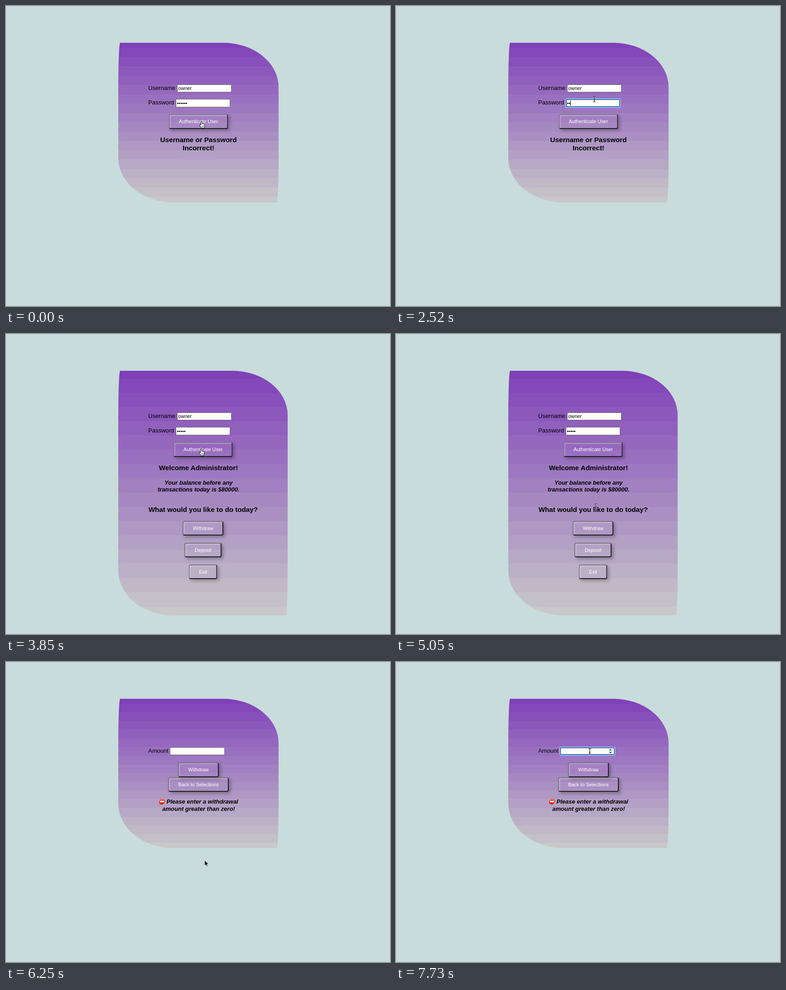
An HTML page that plays this animation: 848x661 px, repeating every 8000 ms.

```html
<!DOCTYPE html>
<html lang="en">
<head>
<meta charset="utf-8">
<title>Account login</title>
<style>
  html, body { margin: 0; width: 100%; height: 100%; overflow: hidden; }
  body { position: relative; background: #c8dcdb; color: #000; font: 13px "Liberation Sans", Arial, sans-serif; }
  body *, .field::after { box-sizing: border-box; position: absolute; }

  .timed, .pressable { animation: 8s step-end infinite; }
  .scene { inset: 0; opacity: 0; }
  .card {
    left: 248px; top: 81px; width: 353.5px; height: var(--h);
    border-radius: 4px 122px 4px 122px / 98px;
  }

  /* --x is the left edge or centre, --y the middle of the line */
  .text { left: var(--x); top: var(--y); line-height: 0; white-space: nowrap; }
  .mid { transform: translateX(-50%); }
  .head { font-weight: bold; font-size: 15.2px; }
  .note { font-weight: bold; font-style: italic; }

  .button {
    left: var(--x); top: var(--y); width: var(--w); height: 32.5px;
    transform: translateX(-50%);
    border: 2px solid; border-color: #7e7685 #201b24 #201b24 #7e7685; border-radius: 4px;
    box-shadow: 4px 4px 7px rgba(0,0,0,.28), inset 2px 2px 2px rgba(255,255,255,.32);
    color: #fff; font-size: 10.9px; line-height: 28px; text-align: center; white-space: nowrap;
  }

  .field {
    left: var(--x); top: var(--y); width: 120.5px; height: 17.5px; padding-left: 2px;
    display: flex; align-items: center;
    background: #fff; border: 1px solid #767676; font-size: 10.9px;
  }
  .field > span { position: static; }
  .field::after {
    content: ""; inset: -1px; opacity: 0; border: 2px solid #1766c0; border-radius: 2px;
    box-shadow: 0 0 0 1px #edf3fa; animation: var(--focus, none) 8s step-end infinite;
  }
  .dots { width: 1.75em; height: 13px; line-height: 13px; overflow: hidden; }
  .caret { width: 1px; height: 12px; background: #000; opacity: 0; }
  .spinner { right: 4px; top: 1px; width: 9px; height: 13px; background: #efefef; opacity: 0; }
  .spinner svg { left: 0; top: 0; }

  .stop {
    left: 338px; top: 301px; width: 13px; height: 13px; border-radius: 50%;
    background: linear-gradient(#ff7a5c, #e8331c 45%, #cc1a0c); transform: skewX(-10deg);
  }
  .stop::after { content: ""; position: absolute; left: 2px; top: 5px; width: 9px; height: 3px; background: #fff; }

  .cursor { left: 0; top: 0; animation-name: move; }
  .cursor svg { left: 0; top: 0; overflow: visible; width: 1px; height: 1px; opacity: 0; }

  @keyframes login    { 0% { opacity: 1 } 48.125% { opacity: 0 } }
  @keyframes menu     { 0%, 78.125% { opacity: 0 } 48.125% { opacity: 1 } }
  @keyframes withdraw { 0% { opacity: 0 } 78.125%, 100% { opacity: 1 } }

  @keyframes focus-password { 0%, 46.25% { opacity: 0 } 14.875% { opacity: 1 } }
  @keyframes focus-amount   { 0% { opacity: 0 } 91.125%, 100% { opacity: 1 } }
  @keyframes hover-amount   { 0% { opacity: 0 } 89.25%, 100% { opacity: 1 } }
  @keyframes caret-password { 0%, 20.375%, 46.25% { opacity: 0 } 14.875%, 31.5% { opacity: 1 } }
  @keyframes caret-amount   { 0%, 96.625%, 100% { opacity: 0 } 91.125% { opacity: 1 } }
  @keyframes typing {
    0% { width: 2.1em; background: none }
    24.125% { width: 2.1em; background: #b3d7ff }
    31.5% { width: .7em; background: none }
    33.375% { width: 1.05em; background: none }
    37.125%, 100% { width: 1.75em; background: none }
  }
  @keyframes press-login {
    0%, 48.125% { border-color: #7e7685 #201b24 #201b24 #7e7685 }
    46.25% { border-color: #201b24 #7e7685 #7e7685 #201b24 }
  }
  @keyframes press-withdraw {
    0%, 78.125% { border-color: #7e7685 #201b24 #201b24 #7e7685 }
    76.25% { border-color: #201b24 #7e7685 #7e7685 #201b24 }
  }

  @keyframes hand {
    0%, 44.5%, 66.875%, 87.5% { opacity: 1 }
    9.25%, 57.5%, 72.5%, 89.25% { opacity: 0 }
  }
  @keyframes arrow {
    9.25%, 42.625%, 57.5%, 65%, 72.5% { opacity: 1 }
    0%, 11.125%, 44.5%, 59.375%, 66.875%, 85.625% { opacity: 0 }
  }
  @keyframes beam {
    11.125%, 59.375%, 85.625%, 89.25%, 100% { opacity: 1 }
    0%, 42.625%, 65%, 87.5% { opacity: 0 }
  }
  @keyframes move {
    0% { transform: translate(432px, 254.5px) }
    5.5% { transform: translate(433px, 249px) }
    7.375% { transform: translate(434px, 241px) }
    9.25% { transform: translate(436px, 230px) }
    11.125% { transform: translate(437px, 214px) }
    13% { transform: translate(438px, 205px) }
    40.875% { transform: translate(437px, 215px) }
    42.625% { transform: translate(434px, 235px) }
    44.5% { transform: translate(431px, 253.5px) }
    55.625% { transform: translate(432px, 262px) }
    57.5% { transform: translate(434px, 280px) }
    59.375% { transform: translate(436px, 308px) }
    61.25% { transform: translate(439px, 345px) }
    63.125% { transform: translate(441px, 380px) }
    65% { transform: translate(442px, 405px) }
    66.875% { transform: translate(445px, 417px) }
    68.75% { transform: translate(443px, 423px) }
    70.625% { transform: translate(440px, 430px) }
    72.5% { transform: translate(438.5px, 436.5px) }
    81.875% { transform: translate(437px, 420px) }
    83.75% { transform: translate(435px, 370px) }
    85.625% { transform: translate(432px, 310px) }
    87.5% { transform: translate(430px, 255px) }
    89.25%, 100% { transform: translate(428px, 197px) }
  }
</style>
</head>
<body>
  <div class="scene timed" style="animation-name: login">
    <div class="card" style="--h: 352px"></div>
    <div class="text" style="--x: 314px; --y: 180.5px">Username</div>
    <div class="field" style="--x: 377.5px; --y: 172.5px"><span>owner</span></div>
    <div class="text" style="--x: 314px; --y: 213.3px">Password</div>
    <div class="field" style="--x: 374.5px; --y: 205.3px; --focus: focus-password">
      <span class="dots timed" style="animation-name: typing">••••••</span>
      <span class="caret timed" style="animation-name: caret-password"></span>
    </div>
    <div class="button pressable" style="--x: 425px; --y: 238px; --w: 131px; animation-name: press-login">Authenticate User</div>
    <div class="text mid head" style="--x: 425px; --y: 295px">Username or Password</div>
    <div class="text mid head" style="--x: 425px; --y: 313px">Incorrect!</div>
  </div>

  <div class="scene timed" style="animation-name: menu">
    <div class="card" style="--h: 539px; width: 374px"></div>
    <div class="text" style="--x: 314px; --y: 180.5px">Username</div>
    <div class="field" style="--x: 377.5px; --y: 172.5px"><span>owner</span></div>
    <div class="text" style="--x: 314px; --y: 213.3px">Password</div>
    <div class="field" style="--x: 374.5px; --y: 205.3px"><span class="dots">•••••</span></div>
    <div class="button" style="--x: 435.3px; --y: 238px; --w: 131px">Authenticate User</div>
    <div class="text mid head" style="--x: 425px; --y: 295px">Welcome Administrator!</div>
    <div class="text mid note" style="--x: 425.3px; --y: 327.5px">Your balance before any</div>
    <div class="text mid note" style="--x: 425.3px; --y: 342.5px">transactions today is $80000.</div>
    <div class="text mid head" style="--x: 435.3px; --y: 387px">What would you like to do today?</div>
    <div class="button pressable" style="--x: 435.3px; --y: 411.5px; --w: 90px; animation-name: press-withdraw">Withdraw</div>
    <div class="button" style="--x: 435.3px; --y: 459.5px; --w: 82px">Deposit</div>
    <div class="button" style="--x: 435.3px; --y: 507.5px; --w: 63px">Exit</div>
  </div>

  <div class="scene timed" style="animation-name: withdraw">
    <div class="card" style="--h: 328.5px"></div>
    <div class="text" style="--x: 314px; --y: 195.5px">Amount</div>
    <div class="field" style="--x: 362px; --y: 187.8px; --focus: focus-amount">
      <span class="caret timed" style="animation-name: caret-amount"></span>
      <div class="spinner timed" style="animation-name: hover-amount">
        <svg width="9" height="13"><path d="M1.5 5 4.5 1.5 7.5 5ZM1.5 8 4.5 11.5 7.5 8Z" fill="#4d4d4d"/></svg>
      </div>
    </div>
    <div class="button" style="--x: 425px; --y: 221px; --w: 90px">Withdraw</div>
    <div class="button" style="--x: 425px; --y: 253.5px; --w: 134px">Back to Selections</div>
    <div class="stop"></div>
    <div class="text note" style="--x: 354.5px; --y: 307.5px">Please enter a withdrawal</div>
    <div class="text mid note" style="--x: 425.5px; --y: 323.5px">amount greater than zero!</div>
  </div>

  <div class="cursor timed">
    <svg class="timed" style="animation-name: hand">
      <path d="M-1.6 8V1.3Q-1.5 0-.3 0 1 0 1.1 1.3V5Q2.4 4.2 3.2 5.4 4.6 4.8 5.2 6 6.8 5.7 7 7.3V10Q6.6 12 5.6 14.5H-.4Q-1.6 12-4.3 9 -4.8 7.5-3.5 7.2 -2.5 7.2-1.6 8Z"
        fill="#fff" stroke="#000" stroke-linejoin="round"/>
      <path d="M.8 9.2V12.4M2.7 9.2V12.4M4.6 9.2V12.4" stroke="#000" stroke-width=".7"/>
    </svg>
    <svg class="timed" style="animation-name: arrow">
      <path d="M0 0V12.6L2.9 10 4.8 14.4 6.9 13.5 5 9.3H9Z" fill="#000" stroke="#fff" stroke-width=".9"/>
    </svg>
    <svg class="timed" style="animation-name: beam" fill="none">
      <path id="ibeam" d="M-3-6.5Q-.3-6.5 0-5 .3-6.5 3-6.5M0-5V5M-3 6.5Q-.3 6.5 0 5 .3 6.5 3 6.5M-1.5 2H1.5" stroke="#fff" stroke-width="2.2" stroke-opacity=".7"/>
      <path d="M-3-6.5Q-.3-6.5 0-5 .3-6.5 3-6.5M0-5V5M-3 6.5Q-.3 6.5 0 5 .3 6.5 3 6.5M-1.5 2H1.5" stroke="#000" stroke-width="1.1"/>
    </svg>
  </div>

<script>
  // Purple to grey in even, hard-edged bands.
  const top_ = [127, 64, 185], bottom = [201, 201, 201], bands = 17.17;
  const stops = Array.from({ length: 18 }, (_, k) => {
    const mix = Math.min(1, (k + 0.05) / bands);
    const rgb = top_.map((c, i) => Math.round(c + (bottom[i] - c) * mix));
    const from = Math.max(0, (k - 0.45) / bands * 100), to = (k + 0.55) / bands * 100;
    return `rgb(${rgb}) ${from}% ${to}%`;
  });
  for (const card of document.querySelectorAll('.card'))
    card.style.background = `linear-gradient(${stops})`;
</script>
</body>
</html>
```
